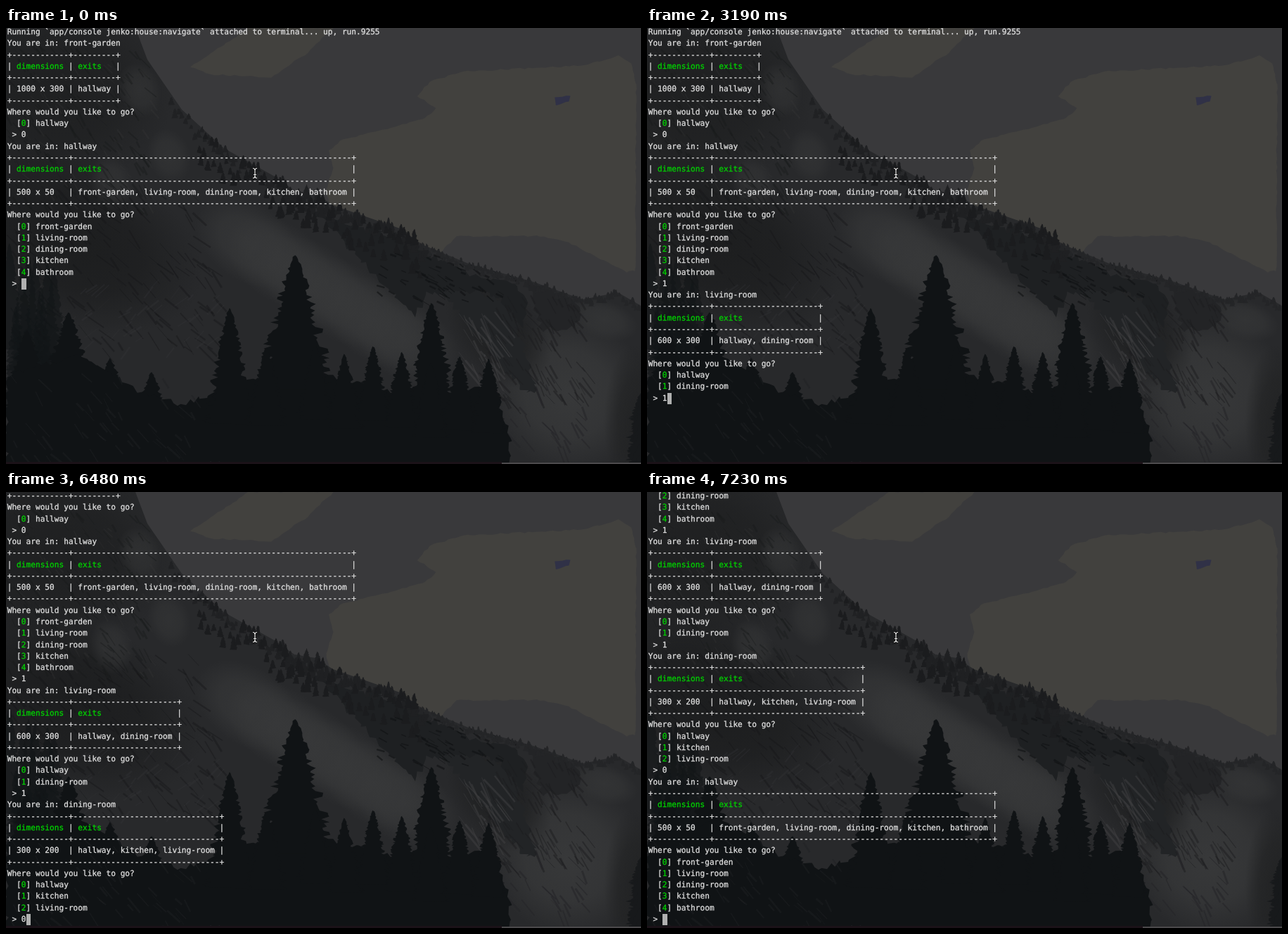
Write an HTML page with a canvas that moves like this. It is 903 px wide and 620 px high and loops after 8 s.

```html
<!DOCTYPE html>
<html lang="en">
<head>
<meta charset="utf-8">
<title>Terminal walk</title>
<style>
  html, body { margin: 0; width: 100%; height: 100%; overflow: hidden; background: #39393b; }
  #stage { position: relative; width: 903px; height: 620px; overflow: hidden; }
  canvas, svg { position: absolute; left: 0; top: 0; }
  .row, #cursor { position: absolute; height: 16px; }
  .row {
    left: 1.7px; white-space: pre; color: #dedede; line-height: 16px;
    font-family: "DejaVu Sans Mono", "Liberation Mono", monospace;
    font-size: 11.15px; text-rendering: geometricPrecision;
    font-variant-ligatures: none; -webkit-text-stroke: 0.3px;
  }
  .row b { font-weight: normal; color: #00d000; }
  #cursor { width: 6.7px; background: #b0b0b0; }
</style>
</head>
<body>
<div id="stage">
  <canvas id="scene" width="903" height="620"></canvas>
  <div id="rows"></div>
  <div id="cursor"></div>
  <svg width="903" height="620" fill="none">
    <path id="beam" d="M351 199.500q3 0 3 3q0-3 3-3M354 202v9M351 213.500q3 0 3-3q0 3 3 3M352 208.500h4" stroke="#151515" stroke-width="3"/>
    <use href="#beam" style="stroke:#e6e6e6"/>
    <path d="M351 199.500q3 0 3 3q0-3 3-3M354 202v9M351 213.500q3 0 3-3q0 3 3 3M352 208.500h4" stroke="#e6e6e6" stroke-width="1.2"/>
  </svg>
</div>
<script>
const LOOP = 8000, CHAR = 6.71, LINE = 16.27, LEFT = 1.7, TOP = -2, VISIBLE = 38;

// ---------- scenery ----------
const W = 903, H = 620;
const ctx = document.getElementById("scene").getContext("2d");
let seed = 7;
const rand = () => (seed = (seed * 16807) % 2147483647) / 2147483647;
const between = (a, b) => a + (b - a) * rand();
const parse = s => s.split(" ").map(p => p.split(",").map(Number));

function fill(points, color) {
  ctx.fillStyle = color;
  ctx.beginPath();
  points.forEach(p => ctx.lineTo(p[0], p[1]));
  ctx.closePath();
  ctx.fill();
}

// Splits each edge into short steps and shakes them.
function rough(points, amount) {
  return points.flatMap((a, i) => {
    const b = points[(i + 1) % points.length];
    const n = Math.ceil(Math.hypot(b[0] - a[0], b[1] - a[1]) / 6);
    return Array.from({ length: n }, (_, k) =>
      [0, 1].map(j => a[j] + (b[j] - a[j]) * k / n + between(-amount, amount)));
  });
}
const shape = (s, color, amount = 2) => fill(rough(parse(s), amount), color);

function glow(x, y, rx, ry, turn, tone, alpha = 0.9) {
  const rgb = `${tone},${tone + 1},${tone + 2}`;
  const g = ctx.createRadialGradient(0, 0, 0, 0, 0, 1);
  g.addColorStop(0, `rgba(${rgb},${alpha})`);
  g.addColorStop(0.55, `rgba(${rgb},${alpha * 0.75})`);
  g.addColorStop(1, `rgba(${rgb},0)`);
  ctx.save();
  ctx.translate(x, y);
  ctx.rotate(turn);
  ctx.scale(rx, ry);
  ctx.fillStyle = g;
  ctx.fillRect(-1, -1, 2, 2);
  ctx.restore();
}

function pine(x, y, height, half, color) {
  const left = [], right = [];
  const step = Math.max(1.5, height / 60);
  for (let d = 0; d <= height; d += step) {
    const w = half * Math.pow(d / height, 0.75) + 0.6;
    left.push([x - w * between(0.65, 1.15), y + d + between(-1, 1)]);
    right.unshift([x + w * between(0.65, 1.15), y + d + between(-1, 1)]);
  }
  fill([...left, ...right], color);
}

// Short slanted marks for rock and snow.
function flecks(n, x, y, w, h, turn, length, color) {
  ctx.strokeStyle = color;
  for (let i = 0; i < n; i++) {
    const px = x + w * rand(), py = y + h * rand();
    const a = turn + between(-0.25, 0.25), l = length * between(0.4, 1);
    ctx.lineWidth = between(0.7, 3);
    ctx.beginPath();
    ctx.moveTo(px, py);
    ctx.lineTo(px + Math.cos(a) * l, py + Math.sin(a) * l);
    ctx.stroke();
  }
}

const ridge = parse("184,0 201,45 250,116 310,171 380,210 410,231 440,236 465,252 560,285 592,308 660,336 750,361 820,386 870,376 903,395");
function ridgeY(x) {
  const i = Math.max(1, ridge.findIndex(p => p[0] >= x));
  const [a, b] = [ridge[i - 1], ridge[i]];
  return a[1] + (b[1] - a[1]) * (x - a[0]) / (b[0] - a[0]);
}
function ridgeTrees(x0, x1, drop, tall, color) {
  for (let x = x0; x < x1; x += between(2, 6)) {
    const h = between(0.4, 1) * tall;
    pine(x, ridgeY(x) + drop * rand() - h * 0.6, h, h * 0.2 + 1.5, color);
  }
}

function paintSky() {
  ctx.fillStyle = "#39393b";
  ctx.fillRect(0, 0, W, H);
  shape("263,55 300,30 345,0 466,0 425,38 378,70 290,66", "#42413e", 1);
  shape("585,97 602,76 650,62 825,53 871,39 889,50 896,80 895,345 882,347 800,305 760,296 640,296 600,340 470,300 455,230 465,200 459,175 475,160 592,130 612,115", "#42413e", 1);
  shape("780,99 802,96 801,104 782,110", "#303147", 0.6);
}

function paintMountain() {
  ctx.save();
  ctx.beginPath();
  [...ridge, [W, H], [0, H], [0, 0]].forEach(p => ctx.lineTo(...p));
  ctx.fillStyle = "#28292b";
  ctx.fill();
  ctx.clip();

  glow(70, 90, 170, 140, 0, 30);
  glow(90, 300, 200, 120, 0.4, 27);
  for (const [x, y] of [[190, 88], [232, 182], [150, 220]]) glow(x, y, 30, 40, -0.3, 52, 0.7);

  // mist follows the slope down to the right
  for (let i = 0; i < 6; i++) glow(345 + i * 45, 305 + i * 28, 85, 55, 0.6, 56, 0.75);
  glow(800, 520, 115, 110, 0.7, 57);
  glow(850, 415, 50, 28, 0.3, 53, 0.8);
  glow(700, 430, 95, 60, 0.9, 31);
  glow(895, 560, 45, 110, 0, 33);

  flecks(150, 0, 20, 200, 240, 0.9, 24, "rgba(24,25,27,.4)");
  flecks(50, 20, 30, 190, 230, 0.9, 18, "rgba(57,57,59,.25)");
  flecks(150, 0, 230, 300, 230, 0.8, 32, "rgba(20,21,23,.4)");
  flecks(45, 30, 370, 270, 110, -0.7, 26, "rgba(58,58,60,.25)");

  shape("440,262 560,300 660,350 718,360 740,385 735,425 690,375 600,378 580,410 520,345", "#1e2022", 4);
  shape("620,372 690,380 722,405 755,520 735,515 660,425", "#222426", 5);
  shape("745,365 800,378 818,400 808,425 762,430", "#232426", 4);
  flecks(70, 525, 315, 195, 75, 0.5, 18, "rgba(16,18,19,.6)");
  flecks(28, 640, 400, 60, 80, 1, 65, "rgba(64,64,66,.5)");
  flecks(90, 670, 380, 150, 150, 1, 32, "rgba(28,29,31,.5)");
  flecks(24, 700, 500, 130, 110, 1, 38, "rgba(37,38,40,.6)");
  ctx.restore();

  ridgeTrees(235, 390, 22, 15, "#202123");
  ridgeTrees(275, 410, 50, 20, "#1b1c1e");
  ridgeTrees(386, 600, 22, 24, "#1f2022");
  ridgeTrees(390, 590, 50, 24, "#1b1c1e");
  ridgeTrees(590, 900, 10, 12, "#242527");
}

function paintForest() {
  const dark = "#101315";
  for (let x = 5; x < 70; x += 9) pine(x, between(300, 420), 150, 20, "rgba(18,20,22,.55)");
  for (let i = 0; i < 4; i++) pine(30 + i * 59, 430 + 20 * i - (i === 1 ? 45 : 0), 120, 38, dark);
  shape("0,495 100,465 195,520 250,535 350,500 440,490 560,520 695,512 718,585 714,620 0,620", dark, 4);

  pine(411, 323, 190, 54, dark);
  pine(318, 398, 165, 34, dark);
  pine(605, 391, 150, 36, dark);
  for (let i = 0; i < 7; i++) pine(440 + i * 41, 452 + 9 * Math.sin(i * 2) + i * 4, 105, 25, dark);
  pine(370, 455, 110, 28, dark);
  for (let y = 520; y < H; y += 14) pine(W, y, 40, between(12, 24), "#17191b");
  flecks(55, 0, 490, 270, 120, 0.9, 28, "rgba(31,33,35,.45)");

  ctx.fillStyle = "#1b1218";
  ctx.fillRect(0, 617, 705, 3);
  ctx.fillStyle = "#4c4a4c";
  ctx.fillRect(705, 618, W - 705, 2);
}

// ---------- terminal ----------
const rooms = {
  "front-garden": ["1000 x 300", ["hallway"]],
  "hallway": ["500 x 50", ["front-garden", "living-room", "dining-room", "kitchen", "bathroom"]],
  "living-room": ["600 x 300", ["hallway", "dining-room"]],
  "dining-room": ["300 x 200", ["hallway", "kitchen", "living-room"]]
};

function visit(room, answer) {
  const [size, exits] = rooms[room];
  const list = exits.join(", ");
  const rule = `+${"-".repeat(12)}+${"-".repeat(list.length + 2)}+`;
  const cells = (a, b) => `| ${a.padEnd(10)} | ${b.padEnd(list.length)} |`;
  return [
    `You are in: ${room}`, rule, cells("dimensions", "exits"), rule, cells(size, list), rule,
    "Where would you like to go?", ...exits.map((e, i) => `  [${i}] ${e}`), ` > ${answer}`
  ];
}

const lines = [
  "Running `app/console jenko:house:navigate` attached to terminal... up, run.9255",
  ...visit("front-garden", "0"), ...visit("hallway", "1"), ...visit("living-room", "1"),
  ...visit("dining-room", "0"), ...visit("hallway", "")
];

// start time, index of the last line, text on that line
const steps = [
  [0, 22, " > "], [500, 22, " > 1"], [1090, 27, ""], [1240, 32, " > "], [3190, 32, " > 1"],
  [3930, 43, " > "], [6480, 43, " > 0"], [7080, 48, ""], [7230, 56, " > "]
];

const rowBox = document.getElementById("rows");
const cursor = document.getElementById("cursor");
const rowTop = i => Math.round(TOP + i * LINE);
const paint = s => s.replace(/>/g, "&gt;").replace(/dimensions|exits|(?<=\[)\d/g, "<b>$&</b>");

function show([, last, tail]) {
  const first = Math.max(0, last + 1 - VISIBLE);
  rowBox.innerHTML = [...lines.slice(first, last), tail]
    .map((s, i) => `<div class="row" style="top:${rowTop(i)}px">${paint(s)}</div>`).join("");
  cursor.style.left = LEFT + tail.length * CHAR + "px";
  cursor.style.top = rowTop(last - first) + "px";
}

let current;
function tick() {
  const t = performance.now() % LOOP;
  const step = steps.findLast(s => s[0] <= t);
  if (step !== current) show(current = step);
  requestAnimationFrame(tick);
}

paintSky();
paintMountain();
paintForest();
tick();
</script>
</body>
</html>
```
